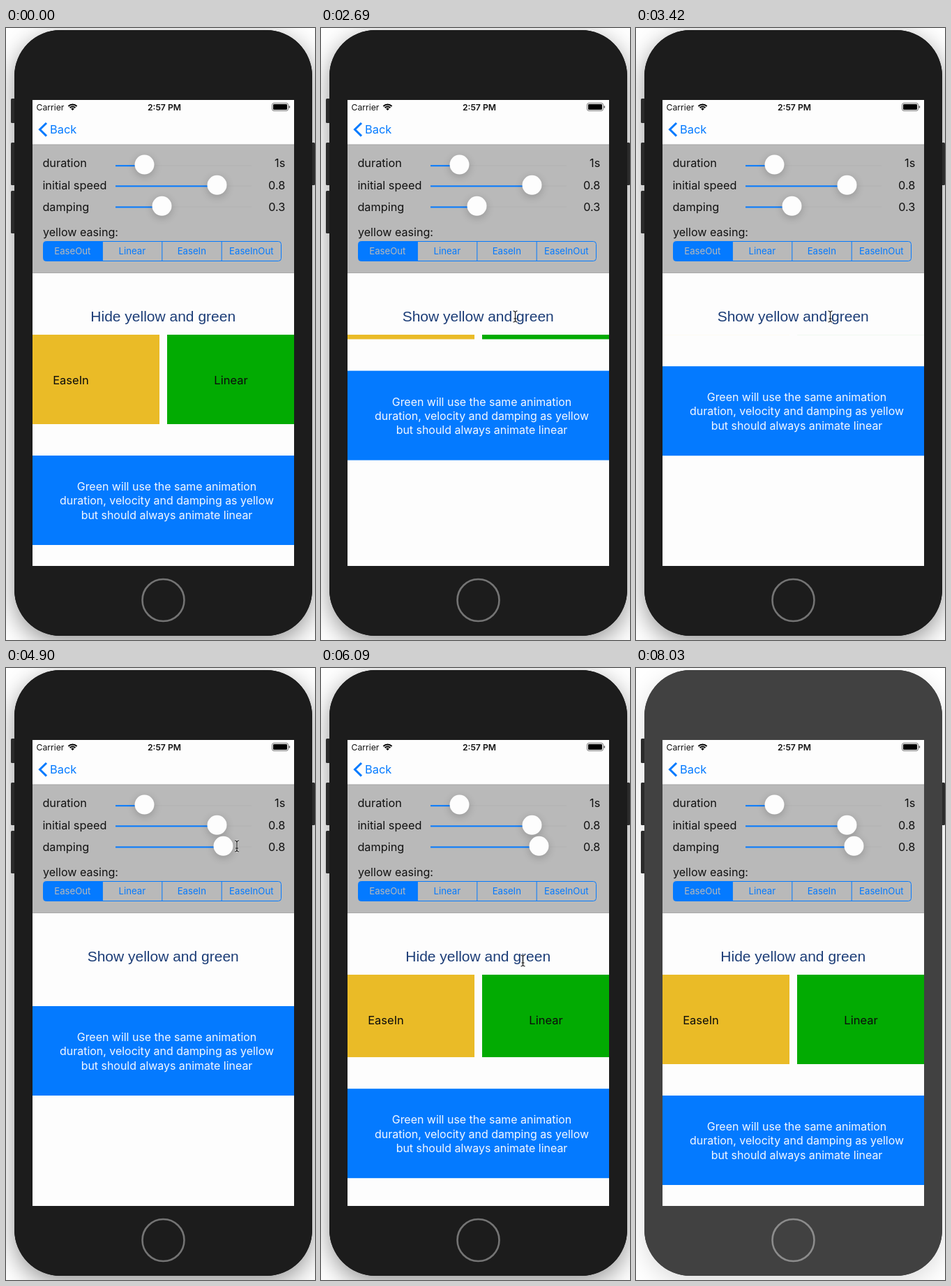
Write an HTML page with a canvas that moves like this. It is 443x876 px and loops after 8130 ms.

```html
<!DOCTYPE html>
<html lang="en">
<head>
<meta charset="utf-8">
<title>Spring animation demo</title>
<style>
html, body { margin: 0; width: 100%; height: 100%; overflow: hidden; background: #fff; }
canvas { display: block; width: 443px; height: 876px; }
</style>
</head>
<body>
<canvas id="stage"></canvas>
<script>
const W = 443, H = 876, LOOP = 8130;
const BLUE = '#047aff', PANEL = '#b9b9b9', PAPER = '#fdfdfd';
const UI = 'Inter, Roboto, sans-serif';
const canvas = document.getElementById('stage');
const ctx = canvas.getContext('2d');
const dpr = window.devicePixelRatio || 1;
canvas.width = W * dpr;
canvas.height = H * dpr;

function rect(x, y, w, h, color) {
  ctx.fillStyle = color;
  ctx.fillRect(x, y, w, h);
}

function roundPath(x, y, w, h, r) {
  ctx.beginPath();
  ctx.roundRect(x, y, w, h, r);
}

function roundRect(x, y, w, h, r, color) {
  roundPath(x, y, w, h, r);
  ctx.fillStyle = color;
  ctx.fill();
}

function line(points, color, width) {
  ctx.beginPath();
  points.forEach(([x, y], i) => i ? ctx.lineTo(x, y) : ctx.moveTo(x, y));
  ctx.strokeStyle = color;
  ctx.lineWidth = width;
  ctx.stroke();
}

function text(str, x, y, size, color, align = 'left', weight = 400, family = UI) {
  ctx.font = `${weight} ${size}px ${family}`;
  ctx.textAlign = align;
  ctx.fillStyle = color;
  ctx.fillText(str, x, y);
}

function shadow(color, blur, dy) {
  ctx.shadowColor = color;
  ctx.shadowBlur = blur * dpr;
  ctx.shadowOffsetY = dy * dpr;
}

// Time is held in steps, as in a low frame rate screen capture.
const STEP = 148, FIRST = 2085;
function hold(t) {
  if (t < 2100) return 0;
  return FIRST + 15 + STEP * Math.floor((t - FIRST) / STEP);
}

// Progress of a damped spring that settles within one second.
function spring(ms, damping, velocity) {
  if (ms <= 0) return 0;
  const s = ms / 1000, decay = 6.9;
  const freq = decay / damping * Math.sqrt(1 - damping * damping);
  return 1 - Math.exp(-decay * s) *
    (Math.cos(freq * s) + (decay - velocity) / freq * Math.sin(freq * s));
}

// Linear interpolation through rows of [time, ...values].
function track(rows, t) {
  if (t <= rows[0][0]) return rows[0].slice(1);
  for (let i = 1; i < rows.length; i++) {
    const a = rows[i - 1], b = rows[i];
    if (t <= b[0]) {
      const k = (t - a[0]) / (b[0] - a[0]);
      return a.slice(1).map((v, j) => v + (b[j + 1] - v) * k);
    }
  }
  return rows[rows.length - 1].slice(1);
}

const pointer = [
  [2100, 325, 426], [2248, 296, 418], [2396, 278.5, 413], [3432, 278.5, 413],
  [3580, 274, 392], [3728, 262, 354], [3876, 246, 285], [4024, 238, 256],
  [4172, 242, 255], [4616, 312, 255], [4912, 331, 255],
  [5060, 322, 296], [5208, 302, 378], [5356, 285, 434], [5504, 289.5, 419]
];
const thumbMove = [[4172, 223.5], [4616, 292], [4912, 311.5], [5060, 312.5]];

const HIDE = 2612, SHOW = 5742;
function blueTop(t) {
  if (t < HIDE) return 612;
  if (t < SHOW) return 612 - 128 * spring(t - HIDE, 0.3, 0.8);
  return 484 + 128 * spring(t - SHOW, 0.8, 0.8);
}

function phone(flash) {
  rect(0, 0, W, H, '#fff');
  const body = flash ? '#414141' : '#1c1c1c';
  ctx.save();
  shadow(flash ? 'rgba(0,0,0,.14)' : 'rgba(0,0,0,.42)', 34, 10);
  roundRect(12, 3, 427, 867, 66, body);
  ctx.restore();
  for (const [x, y, h] of [[7, 101, 35], [7, 164, 61], [7, 233, 61], [437, 164, 61]])
    roundRect(x, y, 6, h, 1.5, '#2b2b2b');
  roundRect(12, 3, 427, 867, 66, body);
  ctx.beginPath();
  ctx.arc(225.5, 819, 30, 0, 7);
  ctx.strokeStyle = flash ? '#8c8c8c' : '#747474';
  ctx.lineWidth = 2.6;
  ctx.stroke();
  rect(38, 103, 375, 667, PAPER);
}

function statusBar() {
  text('Carrier', 43.5, 117.6, 12.2, '#111');
  text('2:57 PM', 227, 117.6, 12.2, '#111', 'center', 600);
  const a = Math.PI * 1.25, b = Math.PI * 1.75;
  ctx.strokeStyle = ctx.fillStyle = '#000';
  ctx.lineWidth = 2;
  for (const r of [8.6, 5.4]) {
    ctx.beginPath();
    ctx.arc(95.5, 118, r, a, b);
    ctx.stroke();
  }
  ctx.beginPath();
  ctx.moveTo(95.5, 118);
  ctx.arc(95.5, 118, 3.2, a, b);
  ctx.fill();
  roundPath(381.5, 107.5, 23, 11, 2.5);
  ctx.lineWidth = 0.8;
  ctx.strokeStyle = '#555';
  ctx.stroke();
  roundRect(383, 109, 20, 8, 1.2, '#000');
  roundRect(405.6, 111.2, 1.5, 3.6, 0.7, '#555');

  ctx.lineJoin = 'miter';
  line([[58, 136], [48.5, 145.3], [58, 154.6]], BLUE, 3);
  text('Back', 63, 151, 16.4, BLUE);
}

function slider(x, y) {
  rect(157, y, 195, 1.6, '#b5b5b5');
  rect(157, y, x - 157, 2, BLUE);
  ctx.save();
  shadow('rgba(0,0,0,.2)', 12, 3);
  ctx.beginPath();
  ctx.arc(x, y - 0.6, 14, 0, 7);
  ctx.fillStyle = PAPER;
  ctx.fill();
  ctx.restore();
}

function settings(thumb) {
  rect(38, 167, 375, 184, PANEL);
  rect(38, 166.5, 375, 1, '#a3a3a3');
  rect(38, 350, 375, 1, '#a9a9a9');
  const damping = ((thumb - 170) / 177.5).toFixed(1);
  const rows = [
    ['duration', '1s', 198.5, 198.5, 196.2],
    ['initial speed', '0.8', 231, 302.5, 225.4],
    ['damping', damping, 262, thumb, 255.4]
  ];
  for (const [label, value, base, x, y] of rows) {
    text(label, 52.4, base, 16.3, '#111');
    text(value, 400.3, base + 0.3, 16.3, '#111', 'right');
    slider(x, y);
  }
  text('yellow easing:', 53, 297.8, 16.1, '#111');

  ctx.save();
  roundPath(53.5, 305.5, 341, 28, 4);
  ctx.clip();
  rect(53, 305, 85, 29, BLUE);
  ctx.restore();
  roundPath(53.5, 305.5, 341, 28, 4);
  ctx.strokeStyle = BLUE;
  ctx.lineWidth = 1;
  ctx.stroke();
  ['EaseOut', 'Linear', 'EaseIn', 'EaseInOut'].forEach((name, i) => {
    if (i) rect(52.5 + i * 85.4, 306, 1, 27, BLUE);
    text(name, 95.3 + i * 85.5, 324.2, 13.2, i ? BLUE : PANEL, 'center');
  });
}

function tile(x, height, color, label, labelX) {
  if (height <= 0) return;
  ctx.save();
  ctx.beginPath();
  ctx.rect(x, 439, 182, height);
  ctx.clip();
  rect(x, 439, 182, height, color);
  text(label, labelX, 509.5, 16.5, '#0c0c0c', 'center');
  ctx.restore();
}

function content(t) {
  const top = blueTop(t);
  const shown = t < HIDE || t >= SHOW;
  text((shown ? 'Hide' : 'Show') + ' yellow and green', 225.2, 420, 21, '#1c3d77',
    'center', 400, '"Liberation Sans", Arial, sans-serif');
  tile(38, top - 484, '#eabb27', 'EaseIn', 93);
  tile(231, top - 484, '#02ab02', 'Linear', 322.5);
  rect(38, top, 375, 128, BLUE);
  [
    'Green will use the same animation',
    'duration, velocity and damping as yellow',
    'but should always animate linear'
  ].forEach((row, i) => text(row, 230.5, top + 50 + i * 20.3, 15.95, '#f4f8ff', 'center'));
}

function beam(x, y) {
  const parts = [
    [[x - 3, y - 8], [x - 1, y - 7.5], [x, y - 6], [x + 1, y - 7.5], [x + 3, y - 8]],
    [[x, y - 6.5], [x, y + 6.5]],
    [[x - 3, y + 8], [x - 1, y + 7.5], [x, y + 6], [x + 1, y + 7.5], [x + 3, y + 8]],
    [[x - 2, y + 3], [x + 2, y + 3]]
  ];
  for (const [color, width] of [['rgba(255,255,255,.7)', 2.6], ['#111', 1.1]])
    parts.forEach(p => line(p, color, width));
}

function draw(now) {
  const clock = now % LOOP;
  const t = hold(clock);
  ctx.setTransform(dpr, 0, 0, dpr, 0, 0);
  phone(clock >= 8030);
  statusBar();
  settings(track(thumbMove, t)[0]);
  content(t);
  if (t >= 2100 && t < 6980) beam(...track(pointer, t));
}

const start = performance.now();
function frame() {
  draw(performance.now() - start);
  requestAnimationFrame(frame);
}
frame();
</script>
</body>
</html>
```
